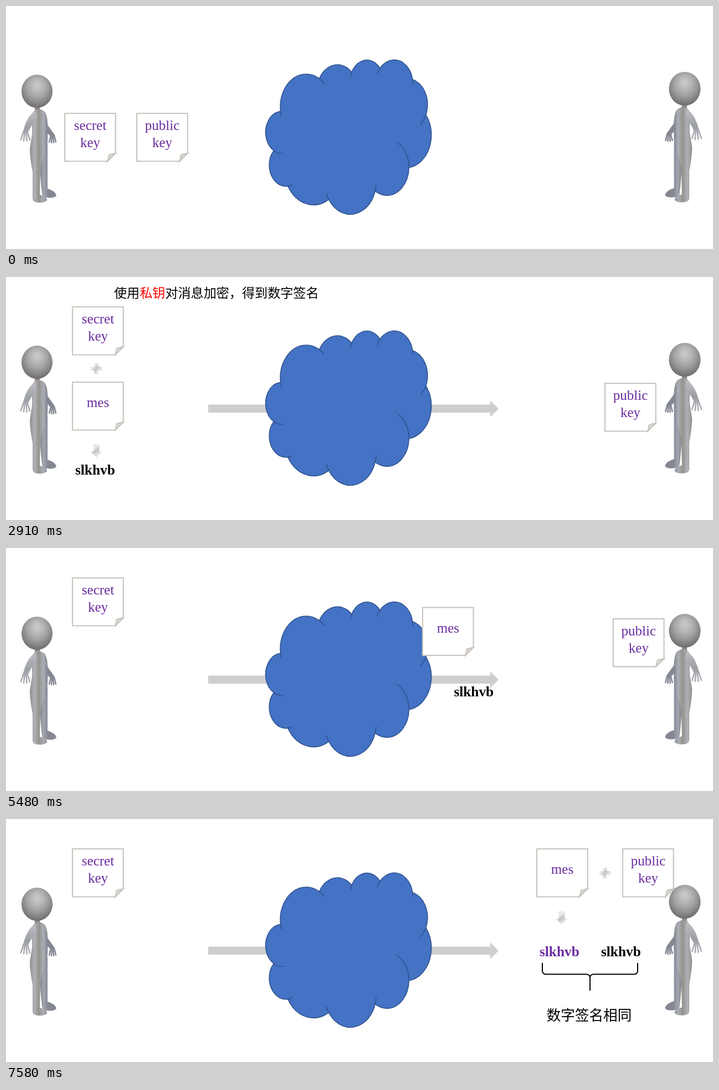
These frames come from a looping animation (1276 px wide and 439 px high, 7970 ms). An HTML page with a canvas:

```html
<!DOCTYPE html>
<html lang="zh">
<head>
<meta charset="utf-8">
<style>
  html, body { margin: 0; width: 100%; height: 100%; overflow: hidden; background: #fff; }
  canvas { display: block; width: 1276px; height: 439px; }
</style>
</head>
<body>
<canvas id="stage" width="1276" height="439"></canvas>
<script>
const ctx = document.getElementById('stage').getContext('2d');
const LOOP = 7970, MORPH = 1040, STARTS = [320, 1900, 3610, 5250];
const SERIF = '"Liberation Serif", "Times New Roman", serif';
const CJK = '"Noto Sans CJK SC", "Noto Sans CJK", sans-serif';
const PURPLE = '#6b2c9f', TURN = 2 * Math.PI;

const clamp = v => Math.max(0, Math.min(1, v));
const smooth = v => { v = clamp(v); return v * v * (3 - 2 * v); };
const mix = (a, b, p) => a.map((v, i) => v + (b[i] - v) * p);

// cubic-bezier(.2, 0, .1, 1)
function ease(x) {
  if (x <= 0 || x >= 1) return clamp(x);
  let lo = 0, hi = 1;
  for (let i = 0; i < 24; i++) {
    const u = (lo + hi) / 2, v = 1 - u;
    if (.6 * u * v * v + .3 * u * u * v + u * u * u < x) lo = u; else hi = u;
  }
  return smooth(lo);
}

function gradient(x0, y0, x1, y1, colors) {
  const g = ctx.createLinearGradient(x0, y0, x1, y1);
  colors.forEach((c, i) => g.addColorStop(i / (colors.length - 1), c));
  return g;
}

function text(str, x, y, font, color, align = 'center') {
  ctx.font = font;
  ctx.fillStyle = color;
  ctx.textAlign = align;
  ctx.fillText(str, x, y);
}

function faded(alpha, draw) {
  if (alpha <= 0) return;
  ctx.save();
  ctx.globalAlpha = alpha;
  draw();
  ctx.restore();
}

function polygon(points) {
  ctx.beginPath();
  points.forEach(([x, y]) => ctx.lineTo(x, y));
  ctx.closePath();
}

// Clockwise ellipses of equal proportions; lead and trail run on into the cloud, in degrees
const STRETCH = 1.27;
const lobe = (x, y, r, lead = 0, trail = 0) => ({ x, y, r, lead, trail });
const LOBES = [
  lobe(541.8, 182.3, 46.7, 9, 14), lobe(598.1, 153, 36.9), lobe(651.3, 136, 30.2, 14),
  lobe(700.6, 140, 33.6, 17, 11), lobe(723.9, 178, 36.9, 0, 26), lobe(720.7, 233, 46.9),
  lobe(687.2, 291.3, 40, 64), lobe(621.5, 317, 46.7, 12, 12), lobe(555, 291.5, 53.4),
  lobe(505.3, 287.3, 30.2, 15), lobe(498.6, 228.3, 30.1, 35)
];

// Where two neighbours cross on the outer side: leave a at one angle, enter b at the other
function joinLobes(a, b) {
  const dx = b.x - a.x, dy = (b.y - a.y) / STRETCH, d = Math.hypot(dx, dy);
  const heading = Math.atan2(dy, dx);
  const along = (d * d + a.r * a.r - b.r * b.r) / (2 * d);
  a.end = heading - Math.acos(along / a.r);
  b.start = heading - Math.acos((along - d) / b.r);
}
LOBES.forEach((b, i) => joinLobes(LOBES.at(i - 1), b));

const cloudBody = new Path2D(), creases = new Path2D();
function addArc(path, { x, y, r }, from, to) {
  path.ellipse(x, y, r, r * STRETCH, 0, from, to);
}
function addCrease(l, from, degrees) {
  const to = from + degrees * TURN / 360;
  creases.moveTo(l.x + l.r * Math.cos(from), l.y + l.r * STRETCH * Math.sin(from));
  addArc(creases, l, from, to);
}
for (const l of LOBES) {
  addArc(cloudBody, l, l.start, l.end);
  if (l.lead) addCrease(l, l.start - l.lead * TURN / 360, l.lead);
  if (l.trail) addCrease(l, l.end, l.trail);
}
cloudBody.closePath();

function drawCloud() {
  ctx.fillStyle = '#4472c4';
  ctx.strokeStyle = '#2f528f';
  ctx.lineWidth = 1.6;
  ctx.fill(cloudBody);
  ctx.stroke(cloudBody);
  ctx.stroke(creases);
}

function drawLongArrow() {
  ctx.fillStyle = '#cecece';
  ctx.fillRect(365, 230.5, 510, 14.5);
  polygon([[874, 223], [889, 238], [874, 253]]);
  ctx.fill();
}

function drawNote([x, y], lines) {
  const r = x + 91.7, b = y + 86.5, fold = 14.5, tuck = 2.9;
  ctx.strokeStyle = '#c9c4bc';
  ctx.lineWidth = 2.1;
  polygon([[x, y], [r, y], [r, b - fold], [r - fold, b], [x, b]]);
  ctx.fillStyle = '#fff';
  ctx.fill();
  ctx.stroke();
  polygon([[r - fold, b], [r - fold + tuck, b - fold + tuck], [r, b - fold]]);
  ctx.fillStyle = '#dcdcdc';
  ctx.fill();
  ctx.stroke();
  const first = lines.length > 1 ? 30 : 45;
  lines.forEach((line, i) => text(line, x + 46, y + first + i * 31, '25px ' + SERIF, PURPLE));
}

function drawCode([x, y], color) {
  text('slkhvb', x, y, 'bold 25.3px ' + SERIF, color, 'left');
}

const MARBLE = ['#d4d4d4', '#efefef', '#c4c4c6', '#e6e6e6', '#cdcdcd'];

function drawPlus(x, y) {
  ctx.fillStyle = gradient(x - 10, y - 8, x + 10, y + 8, MARBLE);
  ctx.beginPath();
  ctx.rect(x - 10, y - 3, 20, 7);
  ctx.rect(x - 3.5, y - 9.5, 7, 20);
  ctx.fill();
}

function drawDownArrow(x, y) {
  ctx.fillStyle = gradient(x - 8, y - 12, x + 8, y + 12, MARBLE);
  ctx.fillRect(x - 5.5, y - 12, 11, 13);
  polygon([[x - 10.5, y + 1], [x + 10.5, y + 1], [x, y + 12]]);
  ctx.fill();
}

// Figure parts around the centre of the head
const BODY = new Path2D('M-4 34Q6 30 14 37Q20 46 19 70Q20 92 17 108Q8 124 6 142L5 187' +
  'Q18 190 18 197Q14 202 2 201Q-8 201-8 193L-8 146Q-13 120-13 104L-9 78Q-8 62-11 51Q-10 39-4 34Z');
const FAR_LEG = new Path2D('M4 98L19 96L19 176Q33 180 35 188Q32 195 10 191Q5 160 4 98Z');
const NEAR_ARM = new Path2D('M-4 36Q-16 44-22 62L-25 72L-16 74Q-10 60 0 50Z');
const FAR_ARM = new Path2D('M17 58L32 79L27 84L17 74Z');

function drawHand(x, y, length) {
  ctx.strokeStyle = ctx.fillStyle;
  ctx.lineWidth = 2.6;
  ctx.lineCap = 'round';
  for (let i = 0; i < 4; i++) {
    const a = 1.1 + i * .32;
    ctx.beginPath();
    ctx.moveTo(x + 3 - i * 2, y);
    ctx.lineTo(x + length * Math.cos(a), y + length * Math.sin(a));
    ctx.stroke();
  }
  ctx.lineCap = 'butt';
}

function drawHead() {
  const shade = ctx.createRadialGradient(0, -.4, .05, 0, -.2, 1.2);
  ['#c9c9ca', '#bababb', '#a6a6a8', '#8c8b8c', '#6f6c6a'].forEach((c, i) => shade.addColorStop(i / 4, c));
  ctx.scale(28, 30);
  ctx.fillStyle = shade;
  ctx.beginPath();
  ctx.arc(0, 0, 1, 0, TURN);
  ctx.fill();
}

function drawMan(x, y, facing, scale) {
  ctx.save();
  ctx.translate(x, y);
  ctx.scale(facing * scale, scale);
  ctx.fillStyle = gradient(4, 0, 20, 0, ['#7f7d80', '#a2a5ae', '#858893']);
  ctx.fill(FAR_LEG);
  ctx.fill(FAR_ARM);
  drawHand(28, 80, 13);
  ctx.fillStyle = '#8e8782';
  ctx.fillRect(-4, 26, 9, 11);
  ctx.fillStyle = gradient(-13, 0, 20, 0, ['#908b88', '#b0b2b9', '#96928f', '#abaeb6', '#7b7e87']);
  ctx.fill(BODY);
  ctx.fillStyle = gradient(0, 36, 0, 95, ['#bfc0c4', '#9d9fa6', '#b2b4ba']);
  ctx.fill(NEAR_ARM);
  drawHand(-21, 72, 18);
  drawHead();
  ctx.restore();
}

function drawCaption() {
  const size = 23.1, font = size + 'px ' + CJK;
  text('使用', 195, 37, font, '#000', 'left');
  text('私钥', 195 + size * 2, 37, font, '#f00', 'left');
  text('对消息加密，得到数字签名', 195 + size * 4, 37, font, '#000', 'left');
}

function drawResult() {
  ctx.strokeStyle = '#000';
  ctx.lineWidth = 2;
  ctx.beginPath();
  for (const end of [968, 1140]) {
    ctx.moveTo(end, 260);
    ctx.arcTo(end, 280.5, 1054, 280.5, 6);
    ctx.arcTo(1054, 280.5, 1054, 310, 6);
    ctx.lineTo(1054, 310);
  }
  ctx.stroke();
  text('数字签名相同', 1052.5, 364, '25.6px ' + CJK, '#000');
}

function render(t) {
  const phase = STARTS.map(s => clamp((t - s) / MORPH));
  const moved = phase.map(ease);
  const fadeIn = i => smooth((phase[i] - .3) / .65);
  const fadeOut = i => 1 - smooth(phase[i] / .6);

  const secret = mix([106, 194], [120, 54], moved[1]);
  const publicKey = mix(mix([236, 194], [1081, 192], moved[0]), [1113, 54], moved[3]);
  const message = mix(mix([120, 190], [573, 154], moved[2]), [958, 54], moved[3]);
  const code = mix(mix([125, 357], [578, 285.5], moved[2]), [1074, 248], moved[3]);

  ctx.fillStyle = '#fff';
  ctx.fillRect(0, 0, 1276, 439);

  faded(fadeIn(0), drawLongArrow);
  drawCloud();
  drawMan(56, 154, 1, 1);
  drawNote(secret, ['secret', 'key']);
  drawNote(publicKey, ['public', 'key']);
  drawMan(1225, 149.5, -1, 1.02);

  faded(fadeIn(1) * fadeOut(2), () => {
    drawCaption();
    drawPlus(163, 165);
    drawDownArrow(163, 314);
  });
  faded(fadeIn(1), () => {
    drawNote(message, ['mes']);
    drawCode(code, '#000');
  });
  faded(fadeIn(3), () => {
    drawPlus(1081, 97);
    drawDownArrow(1003, 179);
    drawCode([963, 248], PURPLE);
  });
  faded(clamp((t - 6990) / 460), drawResult);
}

function tick() {
  render(performance.now() % LOOP);
  requestAnimationFrame(tick);
}
tick();
</script>
</body>
</html>
```
